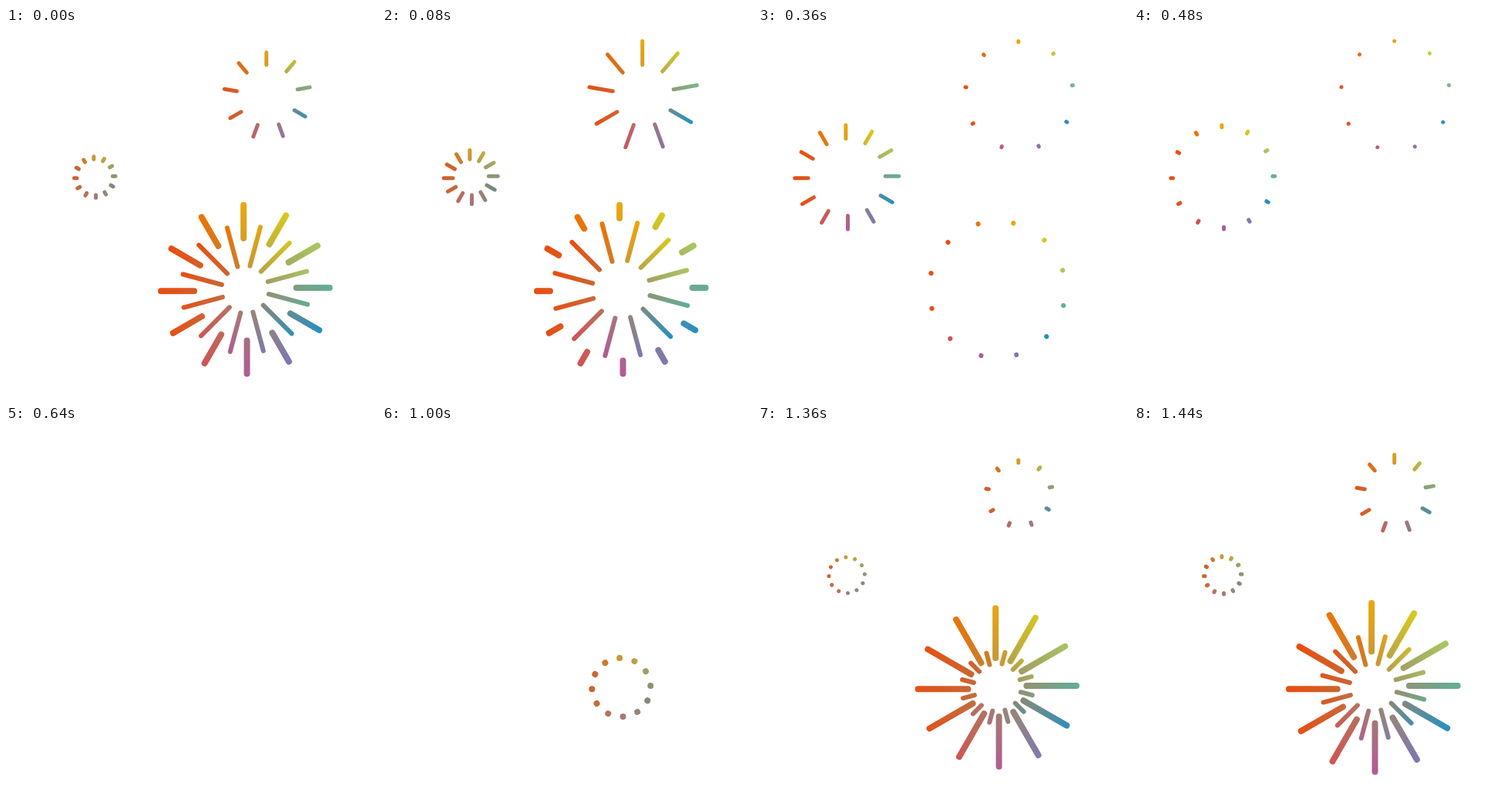
An HTML page with a canvas that plays this animation: 480 by 480 pixels, repeating every 1.48 s.

```html
<!DOCTYPE html>
<html lang="en">
<head>
<meta charset="utf-8">
<title>Fireworks</title>
<style>
  html, body { margin: 0; width: 100%; height: 100%; overflow: hidden; background: #fff; }
  canvas { display: block; width: 100vw; height: 100vh; }
</style>
</head>
<body>
<canvas></canvas>
<script>
const LOOP = 1480;
const STEP = 40;
const STAGE = 480;

// Colours around the wheel, clockwise from the top in 30 degree steps.
const WHEEL = [
  [234, 166, 12], [215, 200, 31], [170, 197, 97], [98, 174, 152],
  [42, 143, 191], [127, 120, 174], [176, 92, 149], [208, 84, 85],
  [229, 80, 24], [232, 78, 18], [232, 79, 15], [235, 116, 4]
];
const CORE = [160, 137, 100];

// Rays run from radius r0 to r1, each shifted sideways by `skew`.
const BURSTS = [
  { x: 310.4, y: 339.1, rays: 12, twist: 0,  skew: -2.2, r0: 38,   r1: 109.4, width: 8, start: 1000, life: 790 },
  { x: 310.4, y: 339.1, rays: 12, twist: 15, skew: -2,   r0: 31,   r1: 88.5,  width: 6, start: 1120, life: 790 },
  { x: 339,   y: 87.8,  rays: 9,  twist: 0,  skew: -1.2, r0: 40,   r1: 70.8,  width: 5, start: 1180, life: 850 },
  { x: 115.2, y: 193.5, rays: 12, twist: 0,  skew: -1.3, r0: 23.2, r1: 67.4,  width: 5, start: 1320, life: 790 }
];

const canvas = document.querySelector("canvas");
const ctx = canvas.getContext("2d");

const clamp = v => Math.min(1, Math.max(0, v));
const mix = (a, b, k) => a.map((v, i) => v + (b[i] - v) * k);
const css = c => `rgb(${c.map(Math.round).join(",")})`;
const rad = deg => deg * Math.PI / 180;

// The tip accelerates outwards, then the tail catches up while slowing down.
const tipAt = s => clamp(s / 372) ** 3;
const tailAt = s => 1 - (1 - clamp((s - 425) / 355)) ** 3;

function wheelColor(deg) {
  const pos = deg / 30;
  const i = Math.floor(pos);
  return mix(WHEEL[i % 12], WHEEL[(i + 1) % 12], pos - i);
}

// Cool hues fade further into the core colour than warm ones.
function rayGradient({ r0, r1 }, deg) {
  const color = wheelColor(deg);
  const fade = (0.58 + 0.18 * Math.cos(rad(deg - 120))) * (1 - r0 / r1) / 0.65;
  const gradient = ctx.createLinearGradient(0, -r0, 0, -r1);
  gradient.addColorStop(0, css(mix(color, CORE, fade)));
  gradient.addColorStop(1, css(color));
  return gradient;
}

function drawBurst(burst, time) {
  const s = (time - burst.start + LOOP) % LOOP;
  if (s >= burst.life) return;
  const { x, y, rays, twist, skew, r0, r1, width } = burst;
  const tip = r0 + (r1 - r0) * tipAt(s);
  const tail = Math.min(r0 + (r1 - r0) * tailAt(s), tip - 0.01);
  ctx.lineWidth = width;
  for (let i = 0; i < rays; i++) {
    const deg = i * 360 / rays;
    ctx.save();
    ctx.translate(x, y);
    ctx.rotate(rad(deg + twist));
    ctx.strokeStyle = rayGradient(burst, deg);
    ctx.beginPath();
    ctx.moveTo(skew, -tail);
    ctx.lineTo(skew, -tip);
    ctx.stroke();
    ctx.restore();
  }
}

function resize() {
  canvas.width = innerWidth * devicePixelRatio;
  canvas.height = innerHeight * devicePixelRatio;
}

let origin;
function frame(now) {
  origin ??= now;
  const time = Math.floor((now - origin) % LOOP / STEP) * STEP;
  ctx.setTransform(canvas.width / STAGE, 0, 0, canvas.height / STAGE, 0, 0);
  ctx.clearRect(0, 0, STAGE, STAGE);
  ctx.lineCap = "round";
  BURSTS.forEach(burst => drawBurst(burst, time));
  requestAnimationFrame(frame);
}

addEventListener("resize", resize);
resize();
requestAnimationFrame(frame);
</script>
</body>
</html>
```
